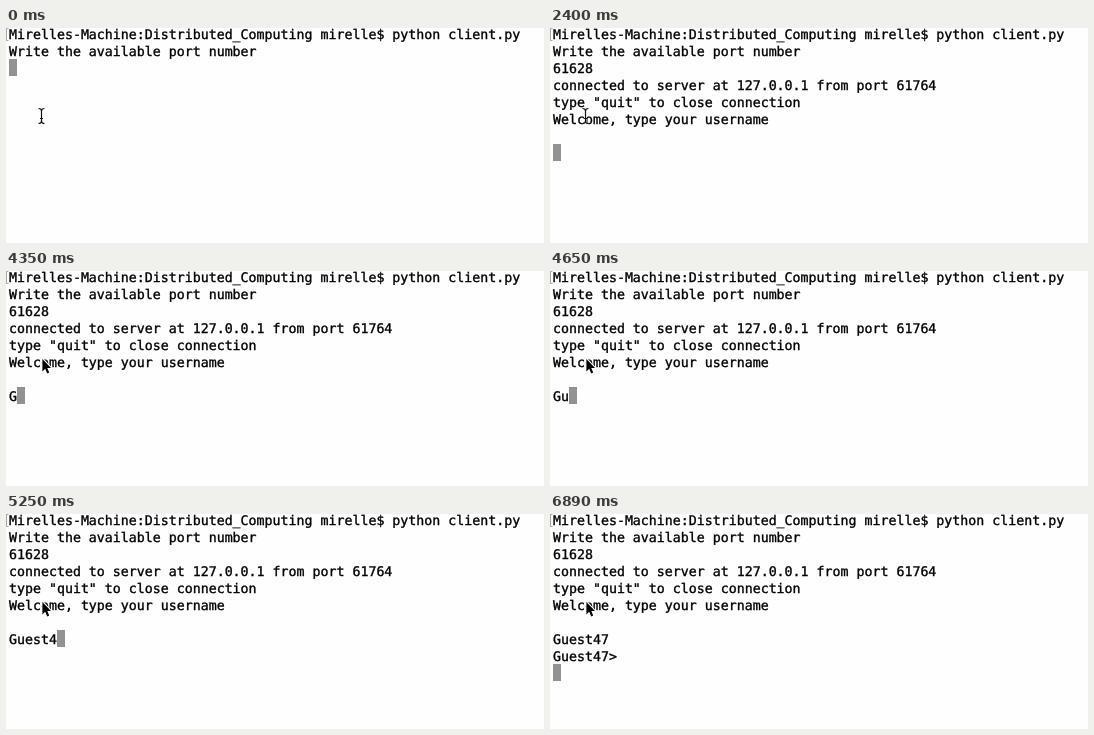
These frames come from a looping animation (538x215 px, 8 s). An HTML page:

```html
<!DOCTYPE html>
<html lang="en">
<head>
<meta charset="utf-8">
<title>Terminal client</title>
<style>
  html, body { margin: 0; width: 100%; height: 100%; overflow: hidden; background: #fefefe; }
  svg { display: block; }
  /* 13.288px gives an advance of 8px; the thin stroke thickens the strokes of the letters */
  text {
    font: 13.288px "DejaVu Sans Mono", monospace;
    fill: #000; stroke: #000; stroke-width: .35px;
    text-rendering: geometricPrecision;
  }
</style>
</head>
<body>
<svg width="538" height="215" viewBox="0 0 538 215">
  <defs>
    <path id="beamShape" d="M32.5 80.5Q35.5 80.5 35.5 83Q35.5 80.5 38.5 80.5M35.5 83V93M34 90.5H37M32.5 95.5Q35.5 95.5 35.5 93Q35.5 95.5 38.5 95.5"/>
  </defs>
  <rect width="538" height="215" fill="#fefefe"/>
  <path d="M2.5 .5H.5V12.5H2.5" fill="none" stroke="#a6a6a6"/>
  <rect id="caret" width="8" height="17" fill="#929292"/>
  <g id="lines"></g>
  <g id="beam" fill="none">
    <use href="#beamShape" stroke="#fff" stroke-width="2.4" stroke-opacity=".7"/>
    <use href="#beamShape" stroke="#111" stroke-width="1.2"/>
  </g>
  <path id="arrow" d="M36.4 88V100.4L39.2 97.8L41.2 102.4L43.2 101.5L41.3 97H45Z" fill="#000" stroke="#fff" stroke-width="2" paint-order="stroke"/>
</svg>
<script>
const LOOP = 8000, LEFT = 3, TOP = -3, COL = 8, ROW = 17;
const NAME = "Guest47";
const PORT_TIME = 1050, REPLY_TIME = 2400, ARROW_TIME = 2550, ENTER_TIME = 6890;
const KEYS = [[4350, 1], [4650, 2], [4800, 4], [5250, 6], [5390, 7]];
const INTRO = [
  "Mirelles-Machine:Distributed_Computing mirelle$ python client.py",
  "Write the available port number"
];
const REPLY = [
  "connected to server at 127.0.0.1 from port 61764",
  'type "quit" to close connection',
  "Welcome, type your username",
  ""
];
const byId = id => document.getElementById(id);

const rows = Array.from({ length: 10 }, (_, i) => {
  const row = document.createElementNS("http://www.w3.org/2000/svg", "text");
  row.setAttribute("x", LEFT);
  row.setAttribute("y", TOP + i * ROW + 14);
  return byId("lines").appendChild(row);
});

function screenAt(t) {
  const port = t < PORT_TIME ? "" : "61628";
  if (t < REPLY_TIME) return [...INTRO, port];
  const typed = KEYS.reduce((n, [at, count]) => t >= at ? count : n, 0);
  const screen = [...INTRO, port, ...REPLY, NAME.slice(0, typed)];
  return t < ENTER_TIME ? screen : [...screen, NAME + ">", ""];
}

function draw(t) {
  const screen = screenAt(t), last = screen.length - 1;
  rows.forEach((row, i) => {
    const line = screen[i] || "";
    if (row.textContent !== line) row.textContent = line;
  });
  byId("caret").setAttribute("x", LEFT + screen[last].length * COL);
  byId("caret").setAttribute("y", TOP + last * ROW);
  byId("beam").style.display = t < ARROW_TIME ? "" : "none";
  byId("arrow").style.display = t < ARROW_TIME ? "none" : "";
}

let start;
function tick(now) {
  start ??= now;
  draw((now - start) % LOOP);
  requestAnimationFrame(tick);
}
draw(0);
requestAnimationFrame(tick);
</script>
</body>
</html>
```
